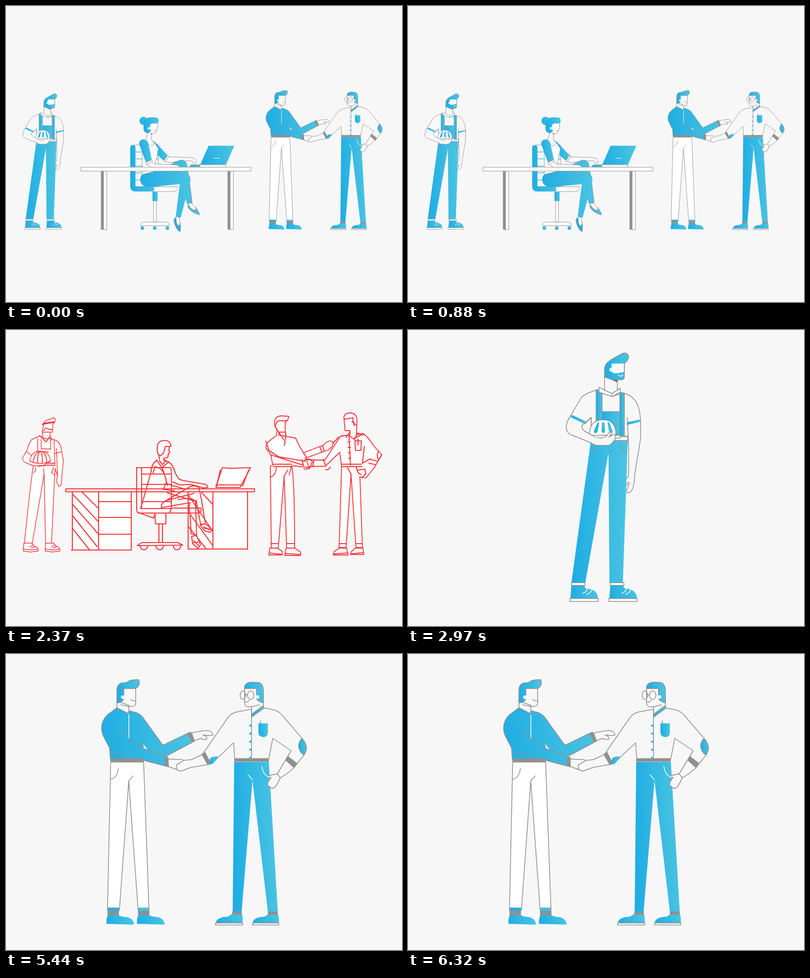
These frames come from a looping animation (800x600 px, 6910 ms). An HTML page without scripts:

```html
<!DOCTYPE html>
<html lang="en">
<head>
<meta charset="utf-8">
<title>People at work</title>
<style>
html, body { margin: 0; width: 100%; height: 100%; overflow: hidden; background: #f7f7f7; }
svg { display: block; width: 100%; height: 100%; }
.scene { visibility: hidden; animation: 6910ms step-end infinite; }
#team { animation-name: team; }
#sketch { animation-name: sketch; }
#solo1 { animation-name: solo1; }
#solo2 { animation-name: solo2; }
#solo3 { animation-name: solo3; }
@keyframes team { 0% { visibility: visible } 21.2735%, 100% { visibility: hidden } }
@keyframes sketch { 0% { visibility: hidden } 21.2735% { visibility: visible } 42.9812%, 100% { visibility: hidden } }
@keyframes solo1 { 0% { visibility: hidden } 42.9812% { visibility: visible } 60.3473%, 100% { visibility: hidden } }
@keyframes solo2 { 0% { visibility: hidden } 60.3473% { visibility: visible } 78.7265%, 100% { visibility: hidden } }
@keyframes solo3 { 0% { visibility: hidden } 78.7265%, 100% { visibility: visible } }
/* b blue, w white, p paper, g grey, l line, k white line, o outlined */
.art { stroke-width: 1.5; stroke-linejoin: round; stroke-linecap: round; }
.b { fill: url(#blue); }
.w { fill: #fff; stroke: #909090; }
.p { fill: #f7f7f7; stroke: #909090; }
.g { fill: #909090; }
.l { fill: none; stroke: #909090; }
.k { fill: none; stroke: #fff; }
.o { stroke: #909090; }
.f { fill: #fff; }
.red { fill: none; stroke: #f5383e; stroke-width: 1.4; stroke-linejoin: round; stroke-linecap: round; }
.mid { stroke-width: 1.8; }
.bold { stroke-width: 2.1; }
</style>
</head>
<body>
<svg viewBox="0 0 800 600" preserveAspectRatio="none">
<defs>
<linearGradient id="blue" x1="0" y1=".55" x2="1" y2=".45">
  <stop offset="0" stop-color="#1fade3"/><stop offset="1" stop-color="#4ac4e2"/>
</linearGradient>

<g id="boot">
  <path class="b" d="M328 544 330 518H357V522Q360 525 368 525 383 529 384 544Z"/>
  <path class="k" d="M353 534Q360 532 362 525M361 536Q369 533 371 527"/>
  <path class="w" d="M327 544.3H384V550.3H327ZM330 512.3H357.5V517.7H330Z"/>
</g>

<g id="worker" class="art">
  <path class="p" d="M397 94V124L412 133 423 122V98Z"/>
  <path fill="#666" d="M404 98 423 101V106Z"/>
  <path class="p" d="M386 121 379 122 366 127Q353 132 349 139L323 183 358 190 370 177V215H446L443 187 470 183Q468 160 463 150 455 133 436 128L412 134Z"/>
  <path class="p" d="M443 178 445 220 446 250 445.500 296 440 303Q435 311 438 315 441 317 444 310 448 307 446 313L441 327Q443 331 448 329 457 325 458 293L470 219V184"/>
  <path class="b" d="M443 187 470 181V186L444 192Z"/>
  <path class="b" d="M369 228 330 513H358L405 249 407 513H434L444 222Z"/>
  <path class="b" d="M392 165.500H428V226H392Z"/>
  <path class="l" d="M392 165.500H428"/>
  <path class="b o" d="M380 121 386 122 392 128V200H380Z"/>
  <path class="b o" d="M428 126 437 128V216H428Z"/>
  <path class="w" d="M386 116 412 129 429 118V126L412 135 386 126ZM412 129V135"/>
  <path class="w" d="M412 216H444V224H412Z"/>
  <path class="w" d="M367 214Q366 182 394 182 420 182 420 213Z"/>
  <path class="b" d="M383 188Q386 185 386 189L383 206Q380 211 376 208 375 206 376 203ZM392 189Q394.500 184 397 189L398 206Q395 212 391 206ZM403 189Q404 185 407 188L413 203Q415 209 410 209 407 209 406 205Z"/>
  <path class="w" d="M367 213.500H429V219H373Z"/>
  <path class="p" d="M358 188Q349 192 352 199 353 203 360 207L373 214Q380 219 390 219 400 218 403 212 407 206 411 207 411 211 406 217 410 215 414 212 418 210 419 215 419 222 415 226 409 234 403 234H385Q375 234 371 229L331 213Q324 210 322 206 317 199 323 183L329 173"/>
  <path class="b" d="M331 172 359 185 356 190 329 177Z"/>
  <path class="l" d="M358 188 370 177V194M372 249Q378 243 379 235M429 230Q431 243 439 249M405 249Q412 244 413 243"/>
  <path class="b o" d="M397 95V78Q397 69 409 61L432 48Q440 44 445 51 448 59 437 68V95Q437 101 431 101H416Q405 99 397 95Z"/>
  <path class="f" d="M411 72Q411 68 414 68H436.500V85L419 88Q413 88 412 84A3.800 3.800 0 1 1 412 77Z"/>
  <path class="l" d="M437 68V86"/>
  <path class="k" d="M425 91Q430 96 434 91"/>
  <use href="#boot"/><use href="#boot" x="78.700"/>
</g>

<g id="leg">
  <path class="g" d="M190.500 288H200V477.500H190.500Z"/>
  <path class="w" d="M199.500 288H209.300V477.500H199.500Z"/>
</g>

<g id="desk" class="art">
  <path class="p" d="M296 203.500H376V338H296Z"/>
  <path d="M302 226H376M302 248.500H376M302 272H376M302 294H376M302 317H376" fill="none" stroke="#2cb3e2" stroke-width="2"/>
  <path class="w" d="M358 338.700H438Q438 354.300 422 354.300H358Z"/>
  <path class="b" d="M285 212Q285 204 293.500 204 302 204 302 212V338H355Q363 338 363 346 363 354 355 354H302Q285 354 285 337Z"/>
  <path class="b" d="M357 354.500H373.500V384.500H357Z"/>
  <path class="w" d="M361 384.500H369.500V453H361ZM317.500 464Q318 453 329 453H400Q411 453 412 464Z"/>
  <circle class="b" cx="324.500" cy="472.500" r="5.700"/><circle class="b" cx="364.500" cy="472.500" r="5.700"/><circle class="b" cx="405" cy="472.500" r="5.700"/>

  <path class="w" d="M336 187 324 202V300L366 289V264L376 216 361 192Z"/>
  <path class="p" d="M342 163 335 188Q346 206 354 207 361 205 361 195L354 187V164Z"/>
  <path fill="#666" d="M348 165 355 166V170Z"/>
  <path class="f" d="M342 134H373V152L369 154V160Q368 166 361 166H348Z"/>
  <path class="l" d="M373.500 133V152L369 154V160Q368 166 361 166H351M360 155Q364 161 369 158"/>
  <circle class="b" cx="328.500" cy="125.500" r="13.500"/>
  <path class="b" d="M328 150V130Q333 114 350 114H368Q377 116 377 124 377 134 368 134H358Q349 134 349 142V158Q346 165 340 165 328 163 328 150Z"/>
  <circle class="f" cx="345.500" cy="149.500" r="4"/><circle class="b" cx="346.500" cy="157.500" r="5.300"/>

  <path class="b" d="M361 191Q366 193 370 199L407 238 396 256 373 236 376 216Z"/>
  <path class="w" d="M410 242 475 244Q490 245 495 249 501 256 498 260 494 265 488 261L485 255 473 254 408 260 398 257Z"/>
  <path class="w" d="M406 237 410 240 398 258 394 255Z"/>

  <path class="w" d="M473 392 484 391Q487 402 496 406 499 412 495 415 483 414 474 399ZM436 436 444 438Q442 448 446 455 446 465 441 466 434 460 433 444Z"/>
  <path class="b o" d="M472 397Q469 402 473 408 480 418 495 425L508 430Q511 427 497 406 499 417 490 415 480 410 472 397ZM431 438Q426 442 426 449 430 468 438 478 443 484 446 484 449 475 446 453 446 465 440 466 433 460 433 444Z"/>
  <path class="b" d="M324 299Q317 305 317 316 320 339 345 340L445 330 432 435 448 438.500 464 376 469 393 485 390 477 327Q481 315 479 310 477 302 473 300L471 288Q470 270 466 260 459 251 448 252 440 253 413 268V288H366Z"/>
  <path class="l" d="M413 268Q440 252 452 252 466 253 469 275M471 288 473 300M477 327 485 390 469 393 464 376M324 299 366 289M370 332 442 291V288"/>
  <path class="w" d="M340 266 349 273Q352 275 356 276H445Q443 270 433 268L362 265 355 256Z"/>
  <path class="b" d="M314 200Q314 186 328 185 341 186 344 200L355 252 337 260Q334 256 332 250Z"/>
  <path class="w" d="M335 261 354 251.500 357 257 338 267Z"/>

  <path class="b" d="M538 206H621L594 267.500H511Z"/>
  <path class="k" d="M554 246.500H573"/>
  <path class="b o" d="M477 275Q478 267.500 488 267.500H510.500V275Z"/>
  <path class="w" d="M510.500 267.500H593.500V275.500H510.500Z"/>
  <use href="#leg"/><use href="#leg" x="408.700"/>
  <path class="w" d="M126.500 275.500H674.500V288H126.500Z"/>
</g>

<g id="shoe">
  <path class="g" d="M205 520H228V530H205Z"/>
  <path class="b" d="M203 547Q202 536 206 529H228Q232 533 243 533 257 535 259 548.500Z"/>
</g>

<g id="shake" class="art">
  <path class="p" d="M224 95V112L248 122V104ZM232 103 249 106.500H253Q261 106 262 100V66H232"/>
  <path class="b o" d="M224 99V75Q224 60 235 58.500L243 58Q252 51 268 52 273 63 262 70H238V88Q237 99 224 99Z"/>
  <circle class="f" cx="236" cy="87.500" r="3.500"/>
  <path class="l" d="M252 92Q256 96 262 95"/>

  <path class="p" d="M375 160 391 157Q405 154 412 156 418 160 418 164.500 409 166 398 164 407 167 406 172 400 175 393 171L380 176Z"/>
  <path class="b o" d="M224 109 248 121 249 115 264 119Q272 123 276 128L317 185 371 159 380 177 322 208V227L278 215H211L209 190 199 171Q193 160 193 151 193 134 205 123Z"/>
  <path class="f" d="M276 181 287 195 278 191Z"/>
  <path class="k" d="M248.300 123V172"/>
  <path class="l" d="M228 152 261 183Q268 188 277 191L322 207M210 198 322 227M276 181 278 191"/>
  <path class="p" d="M396 204 375 214 357 216 345 222Q343 232 346 235 351 238 355 237L373 230 408 224Z"/>
  <path class="p" d="M328 213 356 214Q360 217 354 219L345 224 344 234 328 228"/>
  <path class="g" d="M366 161 373 157.500 382 175.500 375 179ZM321 207 328 209 329 229.500 321 227.500ZM211 212H278V219H211Z"/>
  <path class="w" d="M211.500 219H278L289 520H267L248 257 229 520H205Z"/>
  <path class="b" d="M205.500 514H228.500V520.500H205.500ZM267 514H288.500V520.500H267Z"/>
  <path class="l" d="M227 232Q225 250 212 254M248 257 257 247"/>
  <use href="#shoe"/><use href="#shoe" x="61.700"/>

  <path class="p" d="M496 112 468 117Q455 120 449 128L400 199 408 224 417 222 430 208 460 180 462 212H531L539 171 576 196 548 243 538 245Q529 246 531 250L536 250Q529 258 528 265 535 273 540 272 546 270 554 251 570 242 581 231L602 205Q607 196 607 190 606 180 598 171L558 124Q550 115 540 113L520 109Z"/>
  <path class="p" d="M482 66V100Q483 107 490 107H496V128L520 109V92"/>
  <path class="l" d="M496 107 512 103M496 112V209M514 135V141M482 97Q489 98 491 94"/>
  <path class="b o" d="M482 70Q481 58 496 57L512 58Q520 62 520 75V99Q509 97 506 90V70Z"/>
  <circle class="f" cx="508" cy="87" r="3.600"/>
  <g class="l"><ellipse cx="478.500" cy="83.500" rx="5.500" ry="8.700"/><ellipse cx="494.300" cy="83.500" rx="6.500" ry="8.700"/><path d="M484 83H488"/></g>
  <path class="b o" d="M496 122 519 105 521 110 496 128Z"/>
  <path class="b" d="M510 140.500H529V160Q528 168.500 520 168.500 511 168 510 160Z"/>
  <path class="b" d="M407 224.500 413 211Q420 206 430 208L417 222Z"/>
  <path class="b o" d="M598 171Q606 180 607 190 606 199 602 205 593 200 591 187 592 176 598 171Z"/>
  <path d="M493.700 143V213" fill="none" stroke="#2cb3e2" stroke-width="4.200" stroke-linecap="butt" stroke-dasharray="4.200 12.100"/>
  <path class="g" d="M395 203 402 198 413 219 407 224.500ZM570 207 589 222 582 231.500 564 215ZM461 212H531V218.500H461ZM457 521.500H476.500V529H457ZM529 521.500H549V529H529Z"/>
  <path class="b" d="M461 219H531L549 522H529L498 256 476 522H458Z"/>
  <path class="p" d="M532 250 536 250Q529 258 528 265 535 273 540 272 546 270 554 251L548 243 538 245Q529 246 532 250Z"/>
  <path class="k" d="M517 228Q519 245 532 250M489 245 498 255"/>
  <path class="b" d="M424 545Q425 536 440 533 452 533 454 528H477Q479 535 478 545Z"/>
  <path class="b" d="M498 545Q500 535 515 533 526 533 528 528H550Q552 536 551 545Z"/>
  <path class="w" d="M423.300 545.300H478V549.300H423.300ZM498 545.300H551V549.300H498Z"/>
</g>

<g id="rboot">
  <path class="f" d="M36 432 35 448 50 450 65 448Q65 440 57 438L52 432Z"/>
  <path d="M35 444 51 446 65 444M47 440 54 436M51 442 58 439"/>
</g>
</defs>

<g id="team" class="scene">
  <use href="#worker" transform="translate(-140.400 152.300) scale(.546)"/>
  <use href="#desk" transform="translate(72.500 154.400) scale(.626)"/>
  <use href="#shake" transform="translate(415.800 141.900) scale(.567)"/>
</g>

<g id="sketch" class="scene red">
  <path class="f" d="M68 215 52 222Q46 230 43 243L33 260Q34 266 40 269L55 275 47 338 37 433H53L77 292 80 433H92L99 280 104 296Q101 306 104 312L107 318Q113 314 112 305L116 265 111 238Q109 228 101 224L89 219 81 221Z"/>
  <path class="f" d="M73 192 80 184 96 178Q102 180 98 188L95 190 94 207H73L76 192Z"/>
  <path class="mid" d="M75 191 98 187M77 189 96 186M76 204Q80 196 86 201L94 202M68 214 81 227 89 216 92 223M83 270H99M82 274H99"/>
  <path d="M74 207V216M89 207V216M64 220V247M71 222V241M90 222V243M97 224 99 272M71 241H90M71 247H86M42 247 55 257 62 246M97 251 111 247M102 240 104 295M55 275 66 276 80 275M60 279Q60 287 56 289M96 278 92 290 99 294M76 281 77 296"/>
  <path class="f" d="M48 266Q50 247 68 245 88 246 90 266 70 275 48 266Z"/>
  <path class="mid" d="M55 267Q57 252 66 247M64 269Q63 252 68 247M73 269Q75 254 70 247M82 267Q82 253 74 247M66 275Q78 276 82 270L89 265"/>
  <use href="#rboot"/><use href="#rboot" x="44"/>

  <g class="bold">
    <path class="f" d="M121 322H502V328H121ZM134 328H253V446H132M134 328V446M368 328H488V444H368Z"/>
    <path d="M187 328V446M187 348H253M187 380H253M187 414H253M418 328V444"/>
    <path d="M154 329 186 361M135 333 186 388M135 354 186 413M135 377 184 439M135 403 168 445"/>
    <path d="M395 329 418 354M368 334 417 407M368 368 417 436M368 398 404 443"/>
    <path class="f" d="M264 279H333Q335 282 334 362L330 371H267Q264 369 264 360ZM301 371H323V393H302ZM309 393H316V431H309ZM265 437 274 431H347L357 436Z"/>
    <path d="M274 280V362H333M275 292H333M275 313H333M275 348H333M264 322H340M264 328H340M267 370 298 381 302 371M330 371H390Q396 368 394 361H334"/>
    <path d="M271 438A7 7 0 1 0 286 438M303 438A7 7 0 1 0 318 438M338 438A7 7 0 1 0 353 438"/>
    <path class="f" d="M307 252Q302 230 313 225 330 221 333 233V236H322L318 250 312 255Z"/>
    <path d="M330 236 329 244 331 248 328 251 327 258 319 260 319 265M309 253 310 262M304 263 315 279 328 268 320 263M310 265 316 273 323 265"/>
    <path d="M304 265Q294 271 293 288L272 362M328 267Q338 273 342 290L349 302 357 305 398 312Q406 312 408 319L398 320 374 313 351 314 337 308M315 279Q322 295 324 308L318 323 340 326M297 290 301 277Q315 279 321 295L326 315M326 312 360 322"/>
    <path d="M314 360Q312 352 323 346L371 318Q382 313 390 320L395 345 403 394 393 393 384 345M314 360 372 350Q368 362 372 375L374 413 385 416 383 350Q381 337 348 344M323 346 380 331M326 330 385 348"/>
    <path class="f" d="M392 395 403 393 417 405 412 410 401 407ZM375 418 385 417 393 435 388 443 377 433Z"/>
    <path d="M399 399 411 405M379 427 390 438M401 402 414 404M378 431 388 430"/>
    <path class="f" d="M437 279Q452 281 465 280L494 279 473 319H424Z"/>
    <path d="M433 284 425 318M424 314H476M490 284 478 316"/>
  </g>

  <g class="mid">
    <path class="f" d="M543 192Q540 176 555 174L571 175Q572 181 564 187V207H551V213L585 219 592 234 601 249 642 233Q653 220 661 228 662 236 651 243L604 260Q615 264 618 272L614 279 577 275Q583 300 583 442H567L562 296 550 442H536L534 276 539 274 535 253 525 239Q526 229 532 225L546 214 548 205Z"/>
    <path class="f" d="M683 181Q681 168 696 168 709 169 709 183L708 212 722 210Q734 220 743 235L759 253 744 279 727 300 715 297 720 441H707L697 292 687 441H673L678 276 674 248 645 276 611 277 607 263 644 264 676 215 695 213V204H685Z"/>
    <path class="f" d="M533 442H548L558 449V456H531ZM566 442H583L595 450V457H563ZM673 442H688L691 456H661L663 449ZM706 442H721L723 455H696L698 449Z"/>
    <path d="M534 298Q545 295 546 279M562 296 569 284M576 278 572 294M535 433H549M567 433H583M533 452 558 455M564 453 594 455M662 454 690 452M697 454 722 451"/>
  </g>
  <g class="bold">
    <path d="M544 194Q546 186 551 184H568M543 195 550 205M551 207 564 226 562 234M565 208V222M525 225 531 244 551 257 604 266M535 253 600 274M540 272H577M540 277H577M601 249 607 258M639 234 643 245M634 236 638 248M598 263 601 275M603 264Q613 258 619 267L613 281 602 282"/>
    <path d="M684 181 701 178V188L708 193M699 186Q704 185 703 194M695 206 687 218M676 215 692 213 704 222 710 209 722 213M693 216 696 274M704 219 717 213M679 272H718M678 277H719M705 224 718 225 717 244H706ZM711 221V233M724 236 720 270 736 261M641 262 646 276M736 262 751 266M733 270 747 273M753 245Q747 254 753 263L759 253M711 284 725 282 727 291 719 300M697 292 690 279M708 279Q710 291 717 293M673 433H687M707 433H719M622 264 620 276M646 283Q651 285 655 278M660 230 672 217"/>
    <path d="M691 227H695M691 238H696M692 249H696M692 260H696"/>
  </g>
</g>

<use id="solo1" class="scene" href="#worker"/>
<use id="solo2" class="scene" href="#desk"/>
<use id="solo3" class="scene" href="#shake"/>
</svg>
</body>
</html>
```
